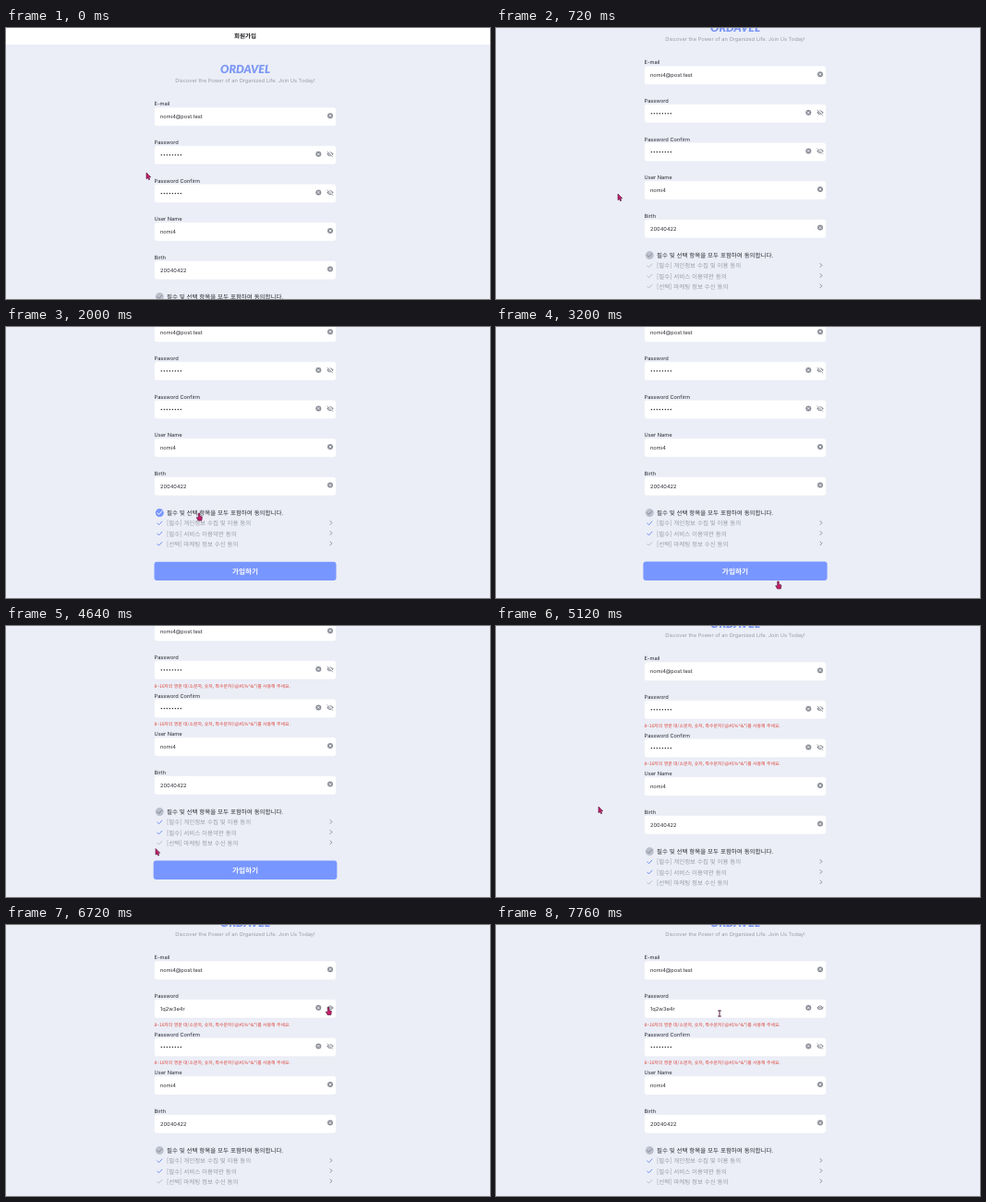
Write an HTML page that moves like this. It is 524x294 px and loops after 8 s.

```html
<!DOCTYPE html>
<html lang="ko">
<head>
<meta charset="utf-8">
<title>회원가입</title>
<style>
  html, body { margin: 0; width: 100%; height: 100%; overflow: hidden; background: #ebeef7; }
  svg { display: block; width: 524px; height: 294px; }
  text { font: 5.7px Inter, "Noto Sans CJK KR", sans-serif; fill: #2b2d33; text-rendering: geometricPrecision; }
  .ko { font: 6.5px "Noto Sans CJK KR", "Noto Sans CJK", sans-serif; }
  .head { font-weight: 700; fill: #17181b; }
  .logo { font: italic 900 12.4px Lato, sans-serif; fill: #7c97f4; }
  .sub { fill: #9a9da7; }
  .item { fill: #999ca6; }
  .join { font-size: 7.6px; font-weight: 700; fill: #fff; }
  .error { font: 4.9px "Noto Sans CJK KR", "Noto Sans CJK", sans-serif; fill: #dc4339; }
  .line { fill: none; stroke-linecap: round; stroke-linejoin: round; }
</style>
</head>
<body>
<svg viewBox="0 0 524 294">
  <defs>
    <g id="clear">
      <circle r="3" fill="#8b8e97"/>
      <path class="line" d="M-1-1L1 1M1-1L-1 1" stroke="#fff" stroke-width=".8"/>
    </g>
    <g id="eye">
      <path d="M-3.7 0Q0-5 3.7 0Q0 5-3.7 0Z" fill="#8b8e97"/>
      <circle r="1.6" fill="#fff"/><circle r=".9" fill="#8b8e97"/>
    </g>
    <g id="eyeOff">
      <use href="#eye"/>
      <path class="line" d="M-2.6-3L3 2.8" stroke="#fff" stroke-width="1.5"/>
      <path class="line" d="M-3-2.7L2.7 3" stroke="#8b8e97" stroke-width=".8"/>
    </g>
    <path id="tick" class="line" d="M-2.5 0L-.8 1.8L2.6-1.9"/>
  </defs>
  <g id="page"></g>
  <g id="cursor" stroke="#4a1038" stroke-width=".6" stroke-linejoin="round">
    <path id="arrow" fill="#c81f68" d="M0 0V6.7L1.5 5.4L2.6 7.7L3.7 7.2L2.7 5L4.7 4.7Z"/>
    <path id="hand" fill="#c81f68" d="M-.8 0H.8V3L3.4 4L2.8 8H-1L-2.8 4.6L-.8 5Z"/>
    <path id="beam" class="line" stroke-width=".9" d="M-1.4-3H1.4M0-3V3M-1.4 3H1.4"/>
  </g>
</svg>
<script>
const LOOP = 8000, TICK = 80;
const BLUE = [120, 150, 255], GREY = [196, 201, 215];
const $ = id => document.getElementById(id);
const rgb = c => `rgb(${c.map(Math.round)})`;
const show = (id, on) => $(id).setAttribute('visibility', on ? 'visible' : 'hidden');
const text = (x, y, s, cls = '', anchor = 'start', id = '') =>
  `<text x="${x}" y="${y}" class="${cls}" text-anchor="${anchor}" id="${id}">${s}</text>`;
const icon = (name, x, y, id = '') => `<use href="#${name}" x="${x}" y="${y}" id="${id}"/>`;

// Page layout
const fields = [
  ['E-mail', 'nomi4@post.test'], ['Password'], ['Password Confirm'],
  ['User Name', 'nomi4'], ['Birth', '20040422']
];
const terms = ['[필수] 개인정보 수집 및 이용 동의', '[필수] 서비스 이용약관 동의', '[선택] 마케팅 정보 수신 동의'];
const rule = '8~16자의 영문 대/소문자, 숫자, 특수문자(!@#$%^&amp;*)를 사용해 주세요.';
const fieldTop = i => 86 + 41.6 * i;

function dots(y, id) {
  let s = `<g id="${id}" fill="#2b2d33">`;
  for (let i = 0; i < 8; i++) s += `<circle cx="${168.3 + i * 3}" cy="${y}" r=".75"/>`;
  return s + '</g>';
}

function field([label, value], i) {
  const top = fieldTop(i), mid = top + 10.2;
  let s = text(160.5, top - 1.6, label) +
    `<rect x="160.5" y="${top}" width="197" height="20.5" rx="3" fill="#fff" stroke="#e3e6ef" stroke-width=".4"/>`;
  if (value) return s + text(167, mid + 2.1, value) + icon('clear', 351, mid - 1);
  s += dots(mid, 'dots' + i) + icon('clear', 338.3, mid - 1) + icon('eyeOff', 351, mid - 1, 'off' + i);
  if (i === 1) s += text(167, mid + 2.1, '1q2w3e4r', '', 'start', 'plain') + icon('eye', 351, mid - 1, 'open');
  return s;
}

function term(label, i) {
  const y = 302.9 + 11.2 * i;
  return icon('tick', 166.3, y, 'tick' + i) + text(174, y + 2.4, label, 'ko item') +
    `<path class="line" stroke="#777a84" stroke-width=".8" d="M351 ${y - 2.4}l1.9 1.9l-1.9 1.9"/>`;
}

$('page').innerHTML =
  '<rect width="524" height="18" fill="#fff"/>' +
  text(259, 11.2, '회원가입', 'ko head', 'middle') +
  text(259, 49.3, 'ORDAVEL', 'logo', 'middle') +
  text(259, 59, 'Discover the Power of an Organized Life. Join Us Today!', 'sub', 'middle') +
  fields.map(field).join('') +
  '<g id="errors">' + [1, 2].map(i => text(160.5, fieldTop(i) + 29.2, rule, 'error')).join('') + '</g>' +
  '<circle id="all" cx="166.3" cy="291.6" r="4.5"/>' + icon('tick', 166.3, 291.6, 'allTick') +
  text(174, 294, '필수 및 선택 항목을 모두 포함하여 동의합니다.', 'ko') +
  terms.map(term).join('') +
  '<g id="button"><rect id="face" x="160.5" y="344.7" width="197" height="20.3" rx="3"/>' +
  text(259, 357.6, '가입하기', 'ko join', 'middle') + '</g>';

// Pointer moves: [start, end, x, y]
const moves = [
  [0, 320, 132, 180], [1120, 1360, 198, 214], [1360, 1520, 209, 202],
  [2400, 2720, 166, 233], [2880, 3120, 275, 281], [3120, 3280, 336, 271], [3280, 3520, 200, 271],
  [4480, 4640, 162, 241.5], [4640, 4800, 111, 196],
  [5120, 5360, 353, 126], [5360, 5440, 368, 129], [5440, 5520, 357, 125], [5520, 5840, 308, 99],
  [5920, 6080, 191, 94], [6080, 6320, 351, 89], [6640, 7360, 272, 109], [7440, 7760, 242, 96]
];
const shapes = [[0, 'arrow'], [1440, 'hand'], [2480, 'arrow'], [2640, 'hand'], [2960, 'arrow'], [3040, 'hand'],
  [4640, 'arrow'], [5680, 'beam'], [6240, 'hand'], [6800, 'beam']];

// Quadratic ease in and out between two times
function ramp(t, from, to) {
  const p = Math.min(1, Math.max(0, (t - from) / (to - from)));
  return p < .5 ? 2 * p * p : 1 - 2 * (1 - p) ** 2;
}

function pointer(t) {
  let x = 152, y = 157;
  for (const [from, to, toX, toY] of moves) {
    const p = ramp(t, from, to);
    x += (toX - x) * p;
    y += (toY - y) * p;
  }
  return [x, y];
}

function setTick(id, color, width = .9) {
  $(id).setAttribute('stroke', color);
  $(id).setAttribute('stroke-width', width);
}

function draw(t) {
  const scroll = 90 * ramp(t, 485, 955) - 43 * ramp(t, 4810, 5120);
  $('page').setAttribute('transform', `translate(0 ${-scroll})`);

  const checked = t >= 1680, optional = checked && t < 2800;
  $('all').setAttribute('fill', optional ? rgb(BLUE) : '#bbc0cc');
  setTick('allTick', optional ? '#fff' : '#858a97', 1);
  terms.forEach((_, i) => setTick('tick' + i, (i < 2 ? checked : optional) ? '#6488f5' : '#b4b9c5'));

  const on = ramp(t, 1600, 1920);
  const grow = 1 + .011 * (ramp(t, 2960, 3200) - ramp(t, 4560, 4800));
  $('face').setAttribute('fill', rgb(GREY.map((g, i) => g + (BLUE[i] - g) * on)));
  $('button').setAttribute('transform', `translate(259 354.85) scale(${grow}) translate(-259 -354.85)`);

  show('errors', t >= 3840);
  const plain = t >= 6640;
  show('plain', plain);
  show('open', plain);
  show('dots1', !plain);
  show('off1', !plain);

  const shape = shapes.filter(s => s[0] <= t).pop()[1];
  ['arrow', 'hand', 'beam'].forEach(s => show(s, s === shape));
  $('cursor').setAttribute('transform', `translate(${pointer(t)})`);
}

const start = performance.now();
function frame() {
  const t = Math.max(0, performance.now() - start) % LOOP;
  draw(Math.floor(t / TICK) * TICK);
  requestAnimationFrame(frame);
}
frame();
</script>
</body>
</html>
```
